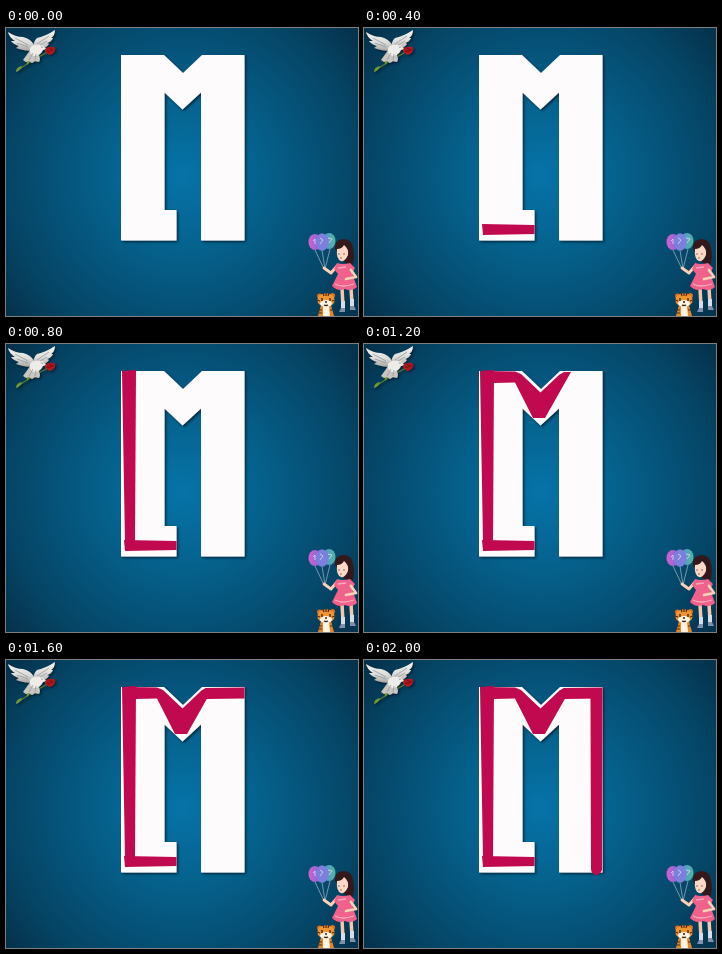
Write an HTML page that moves like this. It is 352 px wide and 288 px high and loops after 2.4 s.

```html
<!DOCTYPE html>
<html lang="en">
<head>
<meta charset="utf-8">
<title>Writing the letter M</title>
<style>
  html, body { margin: 0; width: 100%; height: 100%; overflow: hidden; background: #04304a; }
  svg { display: block; width: 100vw; height: 100vh; }
  .strokes path { fill: #c0094e; animation: 2400ms step-end infinite; }
  .strokes .foot { animation-name: foot; }
  .strokes .stem { animation-name: stem; }
  .strokes .notch { animation-name: notch; }
  .strokes .top { animation-name: top; }
  .strokes .side { animation-name: side; }
  @keyframes foot { 0% { opacity: 0 } 16.66% { opacity: 1 } }
  @keyframes stem { 0% { opacity: 0 } 33.33% { opacity: 1 } }
  @keyframes notch { 0% { opacity: 0 } 50% { opacity: 1 } }
  @keyframes top { 0% { opacity: 0 } 66.66% { opacity: 1 } }
  @keyframes side { 0% { opacity: 0 } 83.33% { opacity: 1 } }
</style>
</head>
<body>
<svg viewBox="0 0 352 288" preserveAspectRatio="none">
  <defs>
    <radialGradient id="sky" gradientUnits="userSpaceOnUse" cx="177" cy="147" r="228">
      <stop offset="0" stop-color="#0673a8"/>
      <stop offset=".3" stop-color="#05648f"/>
      <stop offset=".55" stop-color="#05537a"/>
      <stop offset=".78" stop-color="#054464"/>
      <stop offset="1" stop-color="#05304a"/>
    </radialGradient>
    <filter id="shadow" x="-10%" y="-10%" width="120%" height="120%">
      <feDropShadow dx="1.5" dy="1.5" stdDeviation="1.2" flood-color="#01182b" flood-opacity=".8"/>
    </filter>
    <linearGradient id="wing" x1="0" y1="0" x2="0" y2="1">
      <stop offset="0" stop-color="#f4f4f2"/>
      <stop offset=".55" stop-color="#dcdcda"/>
      <stop offset="1" stop-color="#a8a5a2"/>
    </linearGradient>
    <linearGradient id="violet">
      <stop offset="0" stop-color="#d65fd0"/>
      <stop offset="1" stop-color="#7a68d6"/>
    </linearGradient>
    <linearGradient id="teal">
      <stop offset="0" stop-color="#5b8ddd"/>
      <stop offset="1" stop-color="#4fb8a0"/>
    </linearGradient>
  </defs>

  <rect width="352" height="288" fill="url(#sky)"/>

  <path filter="url(#shadow)" fill="#fdfbfc"
    d="M115 27H158L177 45L196 27H238.500V212.500H195V64.500L176.500 81.500L158.500 64.500V182H170.500V212.500H115Z"/>

  <g class="strokes">
    <path class="foot" d="M118 196L170.500 197V206L119 207Z"/>
    <path class="stem" d="M116 27L130 26L129 197L119 198Z"/>
    <path class="notch" d="M121 27L151 27.500L157 30L176.500 48.500L195 31L200 28H207L181 74H169L151 38.500L129 39Z"/>
    <path class="top" d="M195 31L200 28L238.500 27.500V38.500L200 39L194 48Z"/>
    <path class="side" d="M226.500 38H238.500L238 210Q236 215 232 215Q227 214 227 209Z"/>
  </g>

  <g class="dove" filter="url(#shadow)">
    <path d="M11 43Q24 33 42 24" fill="none" stroke="#55752c" stroke-width="1.200"/>
    <path d="M10 44Q10 39 16 38Q15 42 10 44M21 37Q20 32 24 33Z" fill="#719b32"/>
    <path d="M25 21L17 32L20 34L23 33L26 35L29 33L33 34L34 31L31 20Z" fill="#c9c5c0"/>
    <path d="M28 23Q18 23 10 20L13 18Q7 16 5 13L9 13Q3 9 2 4Q9 9 17 9Q25 11 28 17Z" fill="url(#wing)"/>
    <path d="M28 23Q26 14 31 10Q40 8 49 2Q49 7 45 10L47 10Q45 14 41 15L43 16Q39 21 34 22Z" fill="url(#wing)"/>
    <path d="M24 20Q27 16 33 17Q37 16 38 19L40 21L37 22Q34 28 28 28Q23 26 24 20Z" fill="#eeece8"/>
    <path d="M9 10L22 17M11 15L22 19M31 16L43 8M34 17L41 13M23 32L27 25M29 32L30 26" fill="none" stroke="#8d9296" stroke-width=".7"/>
    <circle cx="36" cy="19" r=".6" fill="#333"/>
    <path d="M39 23Q40 19 44 19Q50 18 49 22Q48 26 43 27Z" fill="#b5181f"/>
    <path d="M41 23Q45 24 48 21M43 20L46 22" fill="none" stroke="#65080f" stroke-width=".8"/>
  </g>

  <g class="balloons">
    <path d="M309 222L318 241M316 222L319 241M324 221L319 241" fill="none" stroke="#c4cbd5" stroke-width=".6"/>
    <ellipse cx="309" cy="214" rx="6.500" ry="8" fill="url(#violet)"/>
    <ellipse cx="323" cy="213" rx="6.500" ry="8" fill="url(#teal)"/>
    <ellipse cx="316" cy="214" rx="6.300" ry="8.800" fill="#7d7fdc"/>
    <path d="M307 213L309 211V216M314 210L317 212L314 216M322 210L326 211L323 215" fill="none" stroke="#d9d3f0" stroke-width=".9"/>
  </g>

  <g class="girl">
    <path d="M336 260L337 278M345 260L346 276" stroke="#f5c7ad" stroke-width="3.500"/>
    <path d="M337 273V281M346 271V279" stroke="#d9dde8" stroke-width="4"/>
    <path d="M335 280H339V284H333ZM344 278H348L350 282H344Z" fill="#8190ab"/>
    <path d="M329 221Q328 212 337 211Q346 211 347 220Q349 231 346 237L339 235Z" fill="#35181c"/>
    <path d="M331 221Q336 221 338 217Q343 221 342 227Q339 234 335 233Q330 231 331 221Z" fill="#fbd9c4"/>
    <path d="M332 226H334M337 226H339M334 230H336" stroke="#8a4a48" stroke-width=".8"/>
    <path d="M331 238L325 245L318 240" fill="none" stroke="#f9d0b8" stroke-width="2.800" stroke-linecap="round" stroke-linejoin="round"/>
    <path d="M331 235Q337 237 344 235L349 240L346 245L351 259Q346 264 339 261Q332 264 326 258L332 246L328 241Z" fill="#f0628c"/>
    <path d="M345 242L350 249L340 251" fill="none" stroke="#f9d0b8" stroke-width="2.800" stroke-linecap="round" stroke-linejoin="round"/>
    <path d="M329 256Q336 260 348 256M332 240L340 239" fill="none" stroke="#fba9bf" stroke-width="1.300"/>
  </g>

  <g class="tiger">
    <path d="M315 277H325L328 288H312Z" fill="#e5862b"/>
    <path d="M317 278H323L324 288H317Z" fill="#fdf3e2"/>
    <circle cx="313.500" cy="268" r="2.500" fill="#d8741e"/>
    <circle cx="326.500" cy="267.500" r="2.500" fill="#d8741e"/>
    <ellipse cx="320" cy="272" rx="8.700" ry="6.800" fill="#f0942f"/>
    <ellipse cx="320" cy="275.500" rx="6" ry="3.500" fill="#fff4e2"/>
    <path d="M320 265V268M317 265L318 268M323 265L322 268M311 272L314 273M329 272L326 273M313 282H316M324 282H327M313 285H316" stroke="#4f2713" stroke-width="1.200"/>
    <path d="M316 270V273M324 270V273M319 274H321M318 277Q320 278 322 277" fill="none" stroke="#382018" stroke-width="1.300"/>
  </g>
</svg>
</body>
</html>
```
